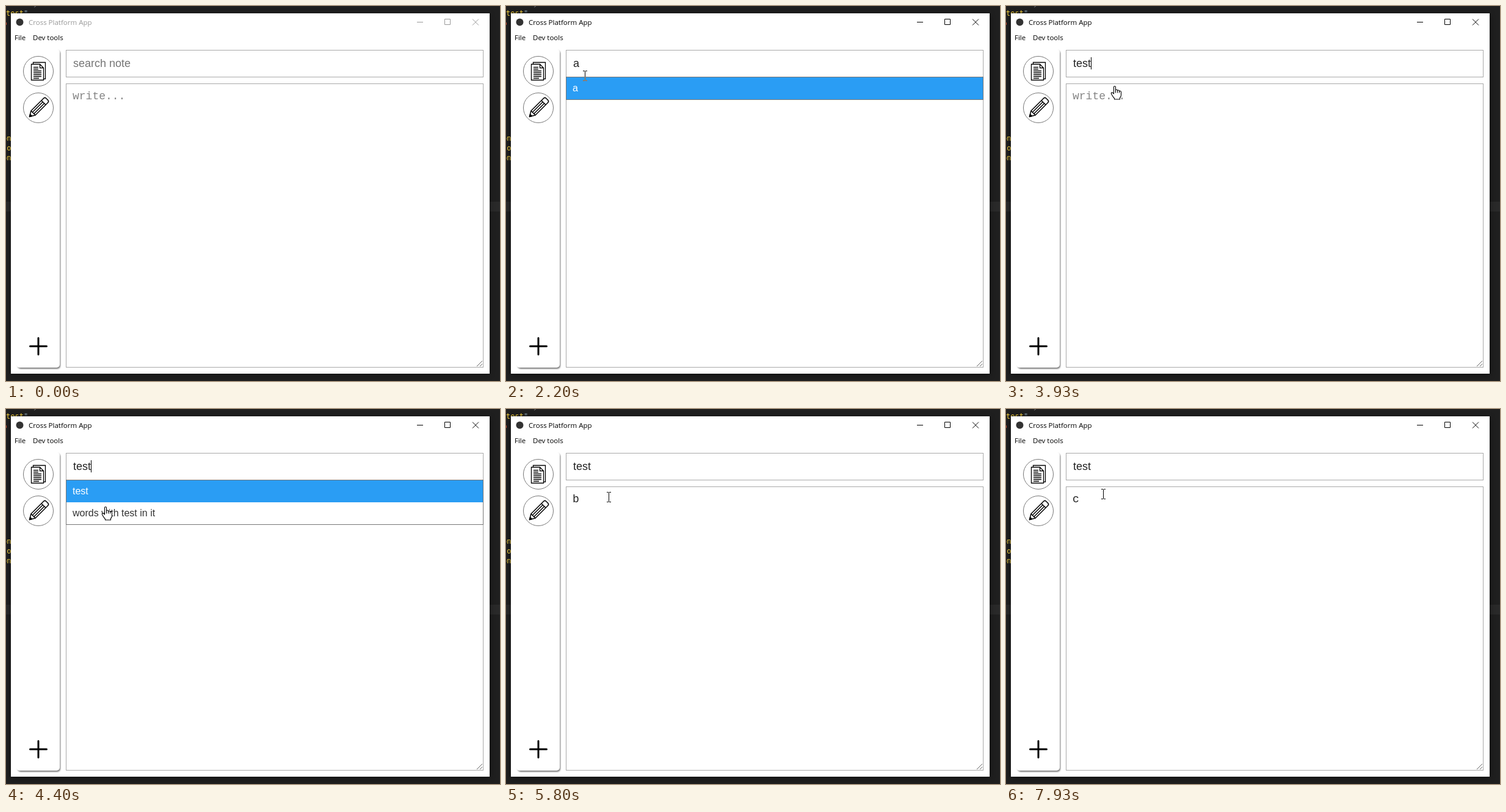
Animation of 809x615 px, one loop 8000 ms. Source, as an HTML page:

```html
<!DOCTYPE html>
<html lang="en">
<head>
<meta charset="utf-8">
<title>Notes app</title>
<style>
  html, body { margin: 0; width: 100%; height: 100%; overflow: hidden; background: #1f1f1f; }
  svg { display: block; width: 809px; height: 615px; }
  .ui { font: 11.5px 'Open Sans', sans-serif; }
  .code { font: 12px 'DejaVu Sans Mono', monospace; fill: #ffd83d; }
  .field { font: 18px 'Liberation Sans', Arial, sans-serif; }
  .item { font: 16px 'Liberation Sans', Arial, sans-serif; }
  .note { font: 18px 'Liberation Mono', 'Courier New', monospace; }
  .line { fill: none; stroke: #000; }
  .box { fill: #fff; stroke: #a9a9a9; }
  #beam { mix-blend-mode: difference; }
</style>
</head>
<body>
<svg viewBox="0 0 809 615">
  <defs>
    <filter id="soft" x="-10%" y="-10%" width="120%" height="120%"><feGaussianBlur stdDeviation="1.3"/></filter>
    <filter id="glow" x="-10%" y="-10%" width="120%" height="120%"><feGaussianBlur stdDeviation="5"/></filter>
  </defs>

  <!-- editor behind the window -->
  <rect width="809" height="615" fill="#1f1f1f"/>
  <rect y="321" width="809" height="16" fill="#292929"/>
  <g class="code">
    <text x="0" y="16">test<tspan fill="#8fa9bd">"</tspan></text>
    <text x="-6" y="221">on</text>
    <text x="-6" y="237">lo</text>
    <text x="-6" y="253">on</text>
  </g>
  <path d="M46 2L49 0" stroke="#777"/>
  <rect y="27" width="1" height="4" fill="#c8472f"/>
  <rect id="shade" x="8" y="14" width="784" height="591" fill="#000" opacity=".35" filter="url(#glow)"/>

  <!-- window -->
  <rect x="8" y="12" width="784" height="591" fill="#fff"/>
  <circle cx="22.5" cy="26.5" r="6" fill="#333"/>
  <g class="ui">
    <text id="title" x="37" y="31">Cross Platform App</text>
    <text x="14" y="56">File</text>
    <text x="44" y="56">Dev tools</text>
  </g>
  <path id="buttons" class="line" d="M673 26.5h10M718.5 21.5h9v9h-9zM764 21.5l10 10M774 21.5l-10 10"/>

  <!-- sidebar -->
  <rect x="19" y="73" width="70" height="522" rx="5" fill="#777" filter="url(#soft)"/>
  <rect x="17" y="71" width="71" height="522" rx="5" fill="#fff"/>
  <circle cx="53" cy="107" r="24.5" fill="#fff" stroke="#777"/>
  <circle cx="53" cy="167" r="24.5" fill="#fff" stroke="#777"/>
  <g class="line" stroke-width="1.3">
    <path d="M44.5 95V92.5H64.5V119.5H62"/>
    <path d="M41.5 95.5H55.5L61.5 101.5V121.5H41.5ZM55.5 95.5V101.5H61.5"/>
    <path d="M45 100.5h8M45 103.5h8M45 106.5h13M45 109.5h13M45 112.5h13M45 115.5h13M45 118.5h9"/>
  </g>
  <g class="line" stroke-width="1.5" stroke-linejoin="round" transform="translate(53 167) rotate(-45)">
    <path d="M-20.5 0L-12 -5H17Q20 -5 20 -2V2Q20 5 17 5H-12ZM-12 -5V5M12 -5V5M-12 -1.7H12M-12 1.7H12"/>
    <path d="M-20.5 0L-17 -2V2Z" fill="#000"/>
  </g>
  <path class="line" stroke-width="3" stroke-linecap="round" d="M39.5 558H66.5M53 544.5V571.5"/>

  <!-- note and search -->
  <rect class="box" x="98.5" y="127.5" width="683" height="465"/>
  <path class="line" style="stroke:#666" d="M771 591L780 582M776 591L780 587"/>
  <rect id="mark" x="109" y="138" width="11" height="20" fill="#3390ff"/>
  <text id="note" class="note" x="109" y="153"></text>
  <rect class="box" x="98.5" y="72.5" width="683" height="44"/>
  <text id="field" class="field" x="110" y="100"></text>

  <!-- suggestions -->
  <g id="list">
    <rect id="frame" x="98.5" y="116.5" width="683" fill="#fff" stroke="#777"/>
    <rect id="pick" x="99" width="682" height="36" fill="#2a9df4"/>
    <text id="item0" class="item" x="109" y="140"></text>
    <text id="item1" class="item" x="109" y="176"></text>
  </g>
  <rect id="caret" width="1" height="20"/>

  <!-- pointers -->
  <path id="arrow" d="M.5 .5V16.5L4.3 13L6.8 18.8L9.3 17.7L6.8 12H12Z" fill="#fff" stroke="#000"/>
  <path id="hand" fill="#fff" stroke="#000" stroke-width="1.1" stroke-linejoin="round"
    d="M-1.5 13V2Q-1.5 .5 0 .5T1.5 2V7.5Q1.7 6 3.1 6T4.6 7.6V8.5Q4.8 7 6.2 7T7.6 8.6V9.5Q7.8 8.3 9 8.3T10.5 10V15Q10.5 18 8.5 19.5V22H-.5V20.5Q-3 18 -5.3 13.5Q-6.2 11.5 -5 11Q-3.8 10.5 -1.5 13ZM1.5 7.5V11.5M4.6 8.5V11.5M7.6 9.5V11.5"/>
  <path id="beam" fill="none" stroke="#fff" d="M-3 -7.5H0M1 -7.5H4M-3 8.5H0M1 8.5H4M.5 -7V8"/>
</svg>
<script>
  const LOOP = 8000, TICK = 1000 / 15;
  const $ = id => document.getElementById(id);
  const set = (id, attrs) => { for (const k in attrs) $(id).setAttribute(k, attrs[k]); };
  const show = (id, on) => set(id, { visibility: on ? 'visible' : 'hidden' });
  const within = (t, ...spans) => spans.some(([a, b]) => t >= a && t < b);

  // pointer hot spot: time, x, y
  const path = [
    [200, -14, 190], [600, 45, 150], [1065, 155, 113], [1395, 252, 84],
    [1550, 252, 84], [2195, 129, 114], [2600, 129, 114], [2900, 140, 93],
    [3460, 178, 131], [3930, 178, 131], [4395, 163, 160], [4460, 163, 172],
    [4600, 165, 177], [4925, 168, 144], [6010, 168, 144], [6195, 160, 138],
    [6395, 152, 157], [6540, 152, 157], [6795, 94, 146], [7000, 94, 146],
    [7260, 156, 152], [7400, 156, 152], [7660, 163, 173], [7925, 159, 134]
  ];
  // what the search field holds from each time on
  const typed = [[0, ''], [1725, 'a'], [3660, 't'], [3725, 'te'], [3795, 'tes'], [3860, 'test']];
  const caretX = { '': 110, a: 120, t: 115, te: 125, tes: 134, test: 139 };

  function pointer(t) {
    const i = path.findIndex(p => p[0] > t);
    if (i < 0) return path[path.length - 1].slice(1);
    if (i === 0) return path[0].slice(1);
    const [t0, x0, y0] = path[i - 1], [t1, x1, y1] = path[i];
    const u = (t - t0) / (t1 - t0), e = u * u * (3 - 2 * u);
    return [Math.round(x0 + (x1 - x0) * e), Math.round(y0 + (y1 - y0) * e)];
  }

  function draw(t) {
    const [x, y] = pointer(t);
    const active = t >= 465;
    set('title', { fill: active ? '#000' : '#999' });
    set('buttons', { style: `stroke:${active ? '#000' : '#999'}` });
    set('shade', { opacity: active ? .5 : .35 });

    const text = typed.filter(k => k[0] <= t).pop()[1];
    $('field').textContent = text || 'search note';
    set('field', { fill: text ? '#222' : '#757575' });

    const body = t < 5795 ? '' : t < 7195 ? 'b' : 'c';
    const marked = within(t, [6730, 7195]);
    $('note').textContent = body || 'write...';
    set('note', { fill: marked ? '#fff' : body ? '#222' : '#858585' });
    show('mark', marked);

    const items = within(t, [1860, 3395]) ? ['a']
      : within(t, [4060, 5795]) ? ['test', 'words with test in it'] : [];
    const picked = t >= 4500 && y >= 153 ? 1 : 0;
    set('list', { display: items.length ? 'inline' : 'none' });
    set('frame', { height: 1 + 36 * items.length });
    set('pick', { y: 117 + 36 * picked });
    [0, 1].forEach(i => {
      $('item' + i).textContent = items[i] || '';
      set('item' + i, { fill: i === picked ? '#fff' : '#333' });
    });

    const inField = within(t, [1125, 1595], [1725, 2130], [3660, 4460], [4925, 5465]);
    const inNote = within(t, [6325, 6660], [7195, 7530]);
    show('caret', inField || inNote);
    set('caret', { x: inNote ? 120 : caretX[text], y: inNote ? 138 : 84 });

    const kind = t < 860 ? 'arrow' : within(t, [3130, 5795]) ? 'hand' : 'beam';
    for (const id of ['arrow', 'hand', 'beam']) show(id, id === kind);
    set(kind, { transform: `translate(${x} ${y})` });
  }

  const start = performance.now();
  function loop() {
    const t = (performance.now() - start) % LOOP;
    draw(Math.floor((t + 1) / TICK) * TICK);
    requestAnimationFrame(loop);
  }
  draw(0);
  requestAnimationFrame(loop);
</script>
</body>
</html>
```
